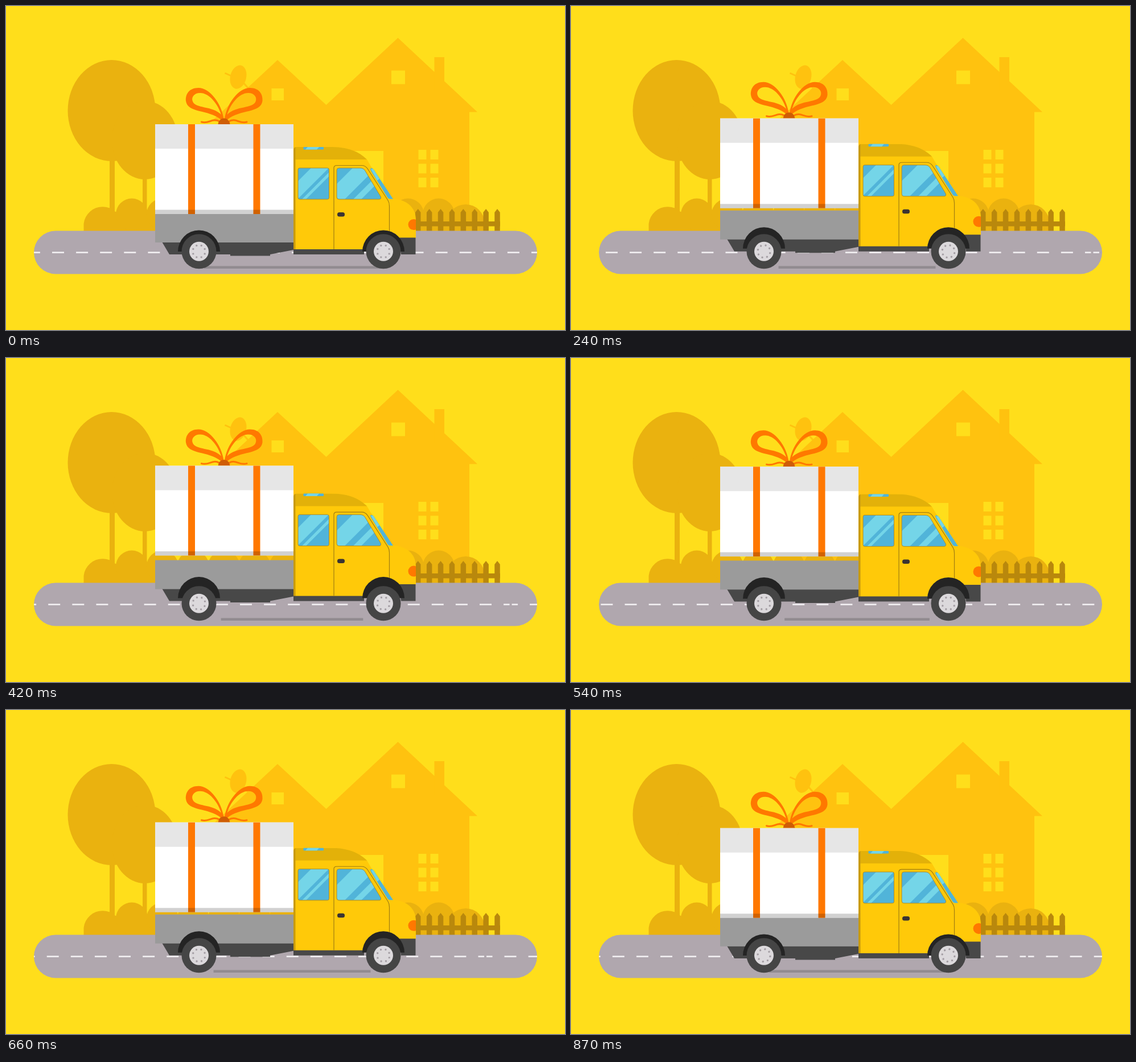
Write an HTML page that moves like this. It is 982x570 px and loops after 900 ms.

```html
<!DOCTYPE html>
<html lang="en">
<head>
<meta charset="utf-8">
<title>Gift delivery</title>
<style>
  html, body { margin: 0; width: 100%; height: 100%; overflow: hidden; background: #ffde1b; }
  svg { display: block; width: 100%; height: 100%; }
  .house { fill: #ffc20f; }
  .plant { fill: #eab20f; }
  .sky { fill: #ffde1b; }
  .fence { fill: #b9880c; }
  .orange { fill: #ff7800; }
  .dark { fill: #484848; }
  .glass { fill: #51b4d9; }
  .shine { fill: #74d5e8; }
  .seam { fill: none; stroke: #a07e12; stroke-width: 1.2; }
</style>
</head>
<body>
<svg viewBox="0 0 982 570">
  <defs>
    <clipPath id="roadClip"><rect x="49" y="395.5" width="884" height="76" rx="38"/></clipPath>
    <clipPath id="rearClip"><rect x="513" y="285" width="54.5" height="55" rx="3"/></clipPath>
    <clipPath id="frontClip"><path id="frontPane" d="M581 289Q581 285 585 285H622Q628 285 631 290L658 335Q660 340 655 340H585Q581 340 581 336Z"/></clipPath>
    <clipPath id="cabClip"><path id="cabShape" d="M505 254Q505 248 511 248H572C600 248 620 256 634 270L641 282L680 339C704 341 720 354 720 376V408L697 429H505Z"/></clipPath>
    <g id="loop">
      <path class="orange" fill-rule="evenodd" d="M382.500 199C379 172 358 144 338 144C322 144 315 155 316 167C319 189 354 181 378 200ZM378 191C372 172 357 153 341 153C330 153 325 161 328 168C333 181 362 175 378 191Z"/>
      <path d="M375 203C362 196 357 208 343.500 204" fill="none" stroke="#ff7800" stroke-width="3" stroke-linecap="round"/>
    </g>
    <g id="wheel">
      <circle r="30.500" fill="#454545"/>
      <circle r="17" fill="#dcd9dc"/>
    </g>
  </defs>

  <rect class="sky" width="982" height="570"/>

  <g class="house">
    <path d="M477 95L562.500 174L688.500 56L828 186.500H814V396H376V203H361Z"/>
    <rect x="752.500" y="90" width="17.500" height="60"/>
    <ellipse cx="408" cy="125" rx="14" ry="21" transform="rotate(14 408 125)"/>
    <path d="M384.500 118L398 124M417 135L432 152" stroke="#ffc20f" stroke-width="3"/>
  </g>
  <g class="sky" id="panes">
    <rect x="677" y="113.500" width="24" height="24"/>
    <rect x="466.500" y="145" width="21.500" height="21"/>
    <rect x="560" y="255" width="103" height="100"/>
  </g>

  <g class="plant" id="plants">
    <ellipse cx="185.500" cy="184" rx="77" ry="89"/>
    <ellipse cx="244" cy="236" rx="58" ry="69"/>
    <rect x="182" y="265" width="9" height="110"/>
    <rect x="240" y="295" width="7.500" height="80"/>
    <path d="M136.500 396V383A33.500 34 0 0 1 203 383V396ZM774 396V383A33.500 34 0 0 1 841 383V396Z"/>
    <rect x="170" y="362" width="640" height="34"/>
  </g>
  <g class="fence" id="fence"><rect x="719" y="379" width="149" height="8.500"/></g>

  <rect x="49" y="395.500" width="884" height="76" rx="38" fill="#b0a7ae"/>
  <g clip-path="url(#roadClip)"><g id="dashes" fill="#f0edf0"></g></g>
  <rect id="shadow" y="457.500" height="4.500" fill="#918b90"/>

  <g id="truck">
    <path class="dark" d="M274 415H505V429L464 437V439.500H394V437H287Z"/>
    <rect x="262" y="365" width="243" height="51" fill="#9b9b9b"/>
    <use href="#cabShape" fill="#ffc909"/>
    <g clip-path="url(#cabClip)">
      <rect x="505" y="247" width="135" height="23" fill="#e3b109"/>
      <rect x="505" y="248" width="3.500" height="181" fill="#c99a0c"/>
      <ellipse class="orange" cx="716" cy="384.500" rx="9.500" ry="9.500"/>
    </g>
    <rect class="dark" x="505" y="428" width="124" height="9"/>
    <path class="dark" d="M690 407.500H719.500V437H694Z"/>
    <path class="seam" d="M576 428V285Q576 280.500 581 280.500H625Q631 280.500 635 286L671 342Q673.500 346 673.500 352V398"/>
    <g clip-path="url(#rearClip)">
      <rect class="glass" x="513" y="285" width="55" height="55"/>
      <path class="shine" d="M513 308L536 285H567L513 339ZM520 340L567 293V300L527 340Z"/>
    </g>
    <rect x="513" y="285" width="54.500" height="55" rx="3" fill="none" stroke="#a98d2b"/>
    <g clip-path="url(#frontClip)">
      <rect class="glass" x="580" y="284" width="80" height="57"/>
      <path class="shine" d="M581 313L609 285H650L595 340H581ZM610 340L650 300V314L624 340Z"/>
    </g>
    <use href="#frontPane" fill="none" stroke="#a98d2b"/>
    <path class="glass" d="M640 286Q643 284 646 288L680 339.500H674Q671 339 669 335L640.500 289Z"/>
    <path class="shine" d="M641 287L645 287L656 304L652 307Z"/>
    <rect class="glass" x="522.500" y="248" width="35.500" height="4.500" rx="1"/>
    <path class="shine" d="M530 248H550L546 252.500H526Z"/>
    <rect x="582" y="363" width="13" height="7.500" rx="3.500" fill="#3b3433"/>
    <path d="M302 432A37 37.500 0 0 1 376 432ZM626 432A37 37.500 0 0 1 700 432Z" fill="#242424"/>
  </g>

  <g id="gift">
    <use href="#loop"/>
    <use href="#loop" transform="matrix(-1 0 0 1 766.500 0)"/>
    <path d="M372.500 208Q374 198 383 197.500Q392 198 393.500 208Z" fill="#cf5d05"/>
    <rect x="262" y="208" width="243" height="158" fill="#fff"/>
    <rect x="262" y="208" width="243" height="43" fill="#e6e6e6"/>
    <path class="orange" d="M320 208H332V366H320ZM434.500 208H446.500V366H434.500Z"/>
    <rect x="262" y="358.500" width="243" height="7.500" fill="#000" opacity=".18"/>
  </g>

  <g id="wheels"></g>
</svg>
<script>
  const NS = 'http://www.w3.org/2000/svg';
  const $ = id => document.getElementById(id);

  function add(parent, tag, attrs) {
    const el = document.createElementNS(NS, tag);
    for (const key in attrs) el.setAttribute(key, attrs[key]);
    return parent.appendChild(el);
  }
  const move = (el, x, y) => el.setAttribute('transform', `translate(${x} ${y})`);

  // House windows, hedge and fence
  for (const x of [724.5, 745.5])
    for (const y of [253, 277.5, 302]) add($('panes'), 'rect', { x, y, width: 14, height: 17 });
  for (let i = 0; i < 11; i++)
    add($('plants'), 'circle', { cx: 221 + 53.9 * i, cy: 366.5, r: 28 });
  for (let i = 0; i < 8; i++)
    add($('fence'), 'path', { d: `M${719 + 19.9 * i} 396v-33l4.750 -6l4.750 6v33z` });

  // Road marks: x = 0 is where two strips join
  const PITCH = 42.1;
  const dash = (x, width) => add($('dashes'), 'rect', { x, y: 432.3, width, height: 2.7 });
  dash(0, 10.5);
  dash(14.5, 10.5);
  for (let i = 1; i < 22; i++) dash(-PITCH * i, 21);
  for (let i = 0; i < 5; i++) dash(46 + PITCH * i, 21);

  // Wheels with a ring of bolts
  const bolts = [339, 663].map(x => {
    const g = add($('wheels'), 'g', { transform: `translate(${x} 431.700)` });
    add(g, 'use', { href: '#wheel' });
    const ring = add(g, 'g', {});
    for (let i = 0; i < 8; i++) {
      const a = (i + 0.5) * Math.PI / 4;
      add(ring, 'circle', { cx: 11 * Math.cos(a), cy: 11 * Math.sin(a), r: 1.7, fill: '#a39da3' });
    }
    return ring;
  });

  const LOOP = 900, STEP = 30, SPEED = 0.2, LAG = 200;

  function draw(t) {
    const lift = (1 - Math.cos(2 * Math.PI * t / LOOP)) / 2;
    move($('gift'), 0, -18.6 * lift);
    move($('truck'), 0, -9.5 * lift);

    const left = 348 + 30 * lift;
    $('shadow').setAttribute('x', left);
    $('shadow').setAttribute('width', 1005 - 2 * left);

    // The road picks up speed towards a steady pace
    const run = SPEED * (t - LAG * (1 - Math.exp(-t / LAG)));
    move($('dashes'), 923 - run, 0);
    for (const ring of bolts) ring.setAttribute('transform', `rotate(${run / 30 * 180 / Math.PI})`);
  }

  const start = performance.now();
  function tick() {
    const t = (performance.now() - start) % LOOP;
    draw(Math.floor(t / STEP) * STEP);
    requestAnimationFrame(tick);
  }
  draw(0);
  requestAnimationFrame(tick);
</script>
</body>
</html>
```
